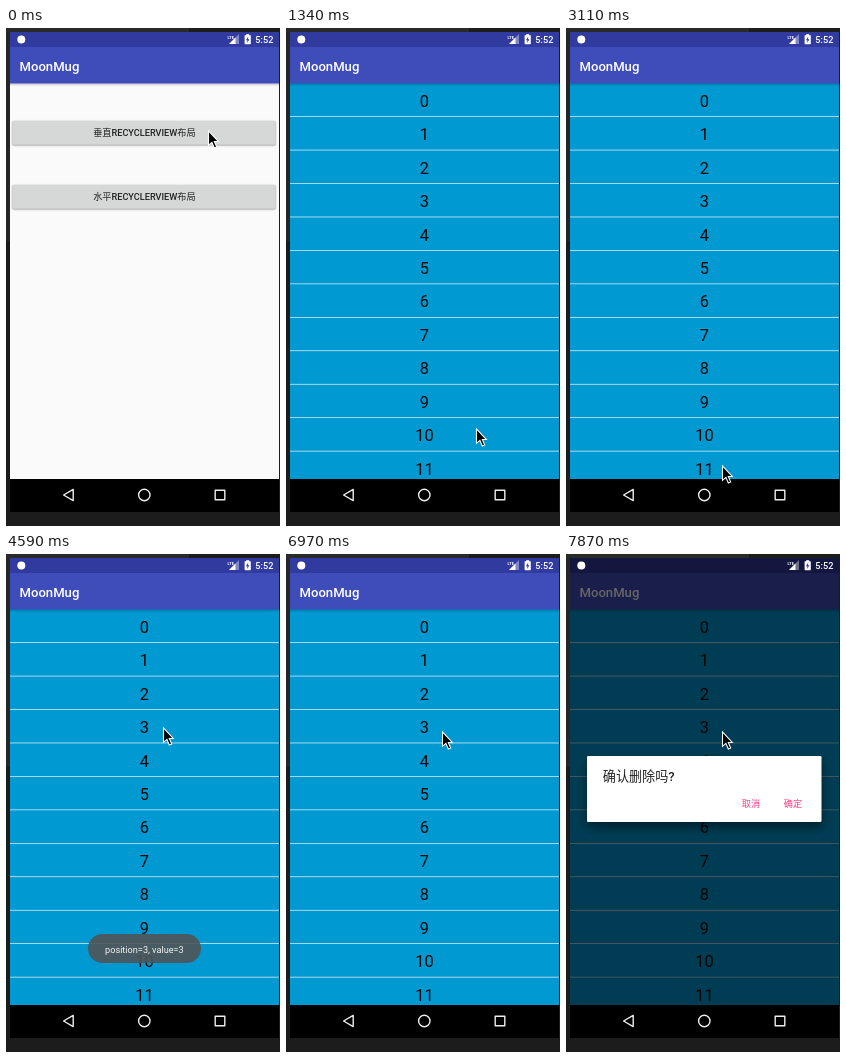
An HTML page with a canvas for the animation above (8000 ms loop, 274 px wide and 498 px high).

```html
<!DOCTYPE html>
<html lang="zh-CN">
<head>
<meta charset="utf-8">
<title>List demo</title>
<style>
html, body { margin: 0; width: 100%; height: 100%; overflow: hidden; background: #1c1c1c; }
canvas { display: block; width: 274px; height: 498px; }
</style>
</head>
<body>
<canvas></canvas>
<script>
const WIDTH = 274, HEIGHT = 498, LOOP = 8000, STEPS = 54;
const LEFT = 4, TOP = 4, SCREEN_W = 269, CENTER = 138.4;
const BAR_TOP = 19, LIST_TOP = 55.5, NAV_TOP = 451, SCREEN_BOTTOM = 484;
const ROWS = 20, ROW_HEIGHT = 33.45, DIVIDER = 0.65;
const MAX_SCROLL = ROWS * ROW_HEIGHT - (NAV_TOP - LIST_TOP);
const BODY_SIZE = 9.16, TITLE_SIZE = 13.1, ROW_SIZE = 16.36;
const STATUS_BLUE = '#303a9f', PINK = '#fb3c86';
const FONT = 'Roboto, "Noto Sans CJK SC", "Noto Sans CJK", sans-serif';

const arrow = new Path2D('M0 0v14.6l3.4-3 2.4 5.6 2.4-1.1-2.4-5.4h4z');
const signal = new Path2D('M223 16h10V6z');
const signalLevel = new Path2D('M223 16h6.5V9.5z');
const bolt = new Path2D('M242.2 8.4l-2.2 3.8h1.4l-.2 2.8 2.2-3.8h-1.4z');
const navIcons = new Path2D('M57.6 467l9.6-5.6v11.2zM209.2 462.2h9.6v9.6h-9.6z');
navIcons.moveTo(144, 467);
navIcons.arc(138.3, 467, 5.7, 0, 2 * Math.PI);

const canvas = document.querySelector('canvas');
const ctx = canvas.getContext('2d');
const ratio = window.devicePixelRatio || 1;
canvas.width = WIDTH * ratio;
canvas.height = HEIGHT * ratio;

const ramp = (step, from, to) => Math.min(1, Math.max(0, (step - from) / (to - from)));
const smooth = p => p * p * (3 - 2 * p);

function cursorAt(step) {
  let x = 202, y = 102;
  const glide = (from, to, toX, toY) => {
    const p = smooth(ramp(step, from, to));
    x += (toX - x) * p;
    y += (toY - y) * p;
  };
  glide(0, 1, 202, 104);
  glide(6, 9, 190, 400);
  glide(9, 12, 183, 11);
  glide(13, 15, 163, 143);
  glide(16, 19, 167, 480);
  glide(20, 21, 156, 437);
  glide(21, 23, 127, 69);
  glide(23, 24, 157, 173);
  glide(43, 47, 156, 177);
  return [x, y];
}

function rect(x, y, w, h, color) {
  ctx.fillStyle = color;
  ctx.fillRect(x, y, w, h);
}

function roundRect(x, y, w, h, r, color) {
  ctx.fillStyle = color;
  ctx.beginPath();
  ctx.roundRect(x, y, w, h, r);
  ctx.fill();
}

function shape(path, color) {
  ctx.fillStyle = color;
  ctx.fill(path);
}

function text(str, x, y, size, color, weight = 400, align = 'center') {
  ctx.font = `${weight} ${size}px ${FONT}`;
  ctx.textAlign = align;
  ctx.fillStyle = color;
  ctx.fillText(str, x, y);
}

function withShadow(blur, offset, alpha, draw) {
  ctx.save();
  ctx.shadowColor = `rgba(0,0,0,${alpha})`;
  ctx.shadowBlur = blur * ratio;
  ctx.shadowOffsetY = offset * ratio;
  draw();
  ctx.restore();
}

function drawFrame() {
  rect(0, 0, WIDTH, HEIGHT, '#1c1c1c');
  rect(0, 0, LEFT, 213, '#262626');
  rect(0, 0, 183, TOP, '#2a2a2a');
  rect(LEFT, TOP, SCREEN_W, SCREEN_BOTTOM - TOP, '#000');
  rect(LEFT, TOP, SCREEN_W, BAR_TOP - TOP, STATUS_BLUE);
}

function drawAppBar() {
  rect(LEFT, TOP, SCREEN_W, BAR_TOP - TOP, STATUS_BLUE);
  rect(LEFT, BAR_TOP, SCREEN_W, LIST_TOP - BAR_TOP, '#3f4dba');
  const shade = ctx.createLinearGradient(0, LIST_TOP, 0, LIST_TOP + 3);
  shade.addColorStop(0, 'rgba(0,0,0,.2)');
  shade.addColorStop(1, 'rgba(0,0,0,0)');
  rect(LEFT, LIST_TOP, SCREEN_W, 3, shade);
  text('MoonMug', 13.5, 42.8, TITLE_SIZE, '#fff', 500, 'left');
}

function drawButton(label, y, pressed) {
  withShadow(pressed ? 4 : 1.5, pressed ? 1.5 : 0.7, 0.4, () =>
    roundRect(6.3, y, 263.4, 24, 1.3, pressed ? '#c3c4c4' : '#d6d7d7'));
  text(label, CENTER, y + 15.2, BODY_SIZE, '#202020', 500);
}

function drawMenu(pressed) {
  rect(LEFT, BAR_TOP, SCREEN_W, NAV_TOP - BAR_TOP, '#fafafa');
  drawButton('垂直RECYCLERVIEW布局', 92.8, pressed);
  drawButton('水平RECYCLERVIEW布局', 156.7, false);
  drawAppBar();
}

function drawList(scroll, shift) {
  ctx.save();
  ctx.translate(0, shift);
  ctx.beginPath();
  ctx.rect(LEFT, TOP, SCREEN_W, NAV_TOP - TOP);
  ctx.clip();
  rect(LEFT, BAR_TOP, SCREEN_W, NAV_TOP - BAR_TOP, '#0099d2');
  for (let i = 0; i < ROWS; i++) {
    const y = LIST_TOP + i * ROW_HEIGHT - scroll;
    rect(LEFT, y + ROW_HEIGHT - DIVIDER, SCREEN_W, DIVIDER, '#fafafa');
    text(i, CENTER, y + 23.2, ROW_SIZE, '#0a0a0a');
  }
  drawAppBar();
  ctx.restore();
}

function drawToast(alpha) {
  ctx.save();
  ctx.globalAlpha = alpha;
  roundRect(82, 380, 113, 29, 14.5, 'rgba(80,85,87,.9)');
  text('position=3, value=3', CENTER, 398.5, BODY_SIZE, '#f4f4f4');
  ctx.restore();
}

function drawDialog(alpha) {
  ctx.save();
  ctx.globalAlpha = alpha;
  rect(LEFT, TOP, SCREEN_W, NAV_TOP - TOP, 'rgba(0,0,0,.6)');
  withShadow(11, 5, 0.5, () => roundRect(21, 202, 234.5, 66, 1.3, '#fff'));
  text('确认删除吗?', 36.8, 227.3, TITLE_SIZE, '#212121', 500, 'left');
  text('取消', 185, 253.3, BODY_SIZE, PINK, 500);
  text('确定', 227, 253.3, BODY_SIZE, PINK, 500);
  ctx.restore();
}

function drawSystemIcons() {
  roundRect(11.3, 7.5, 8, 8, 4, '#fff');
  text('LTE', 221.5, 10.5, 4, '#fff', 700, 'left');
  shape(signal, 'rgba(255,255,255,.4)');
  shape(signalLevel, '#fff');
  rect(240.2, 6.2, 3, 2, '#fff');
  roundRect(238.6, 7.2, 6.2, 9, 0.6, '#fff');
  shape(bolt, STATUS_BLUE);
  text('5:52', 249.3, 15, BODY_SIZE, '#fff', 500, 'left');
  ctx.strokeStyle = '#ededed';
  ctx.lineWidth = 1.4;
  ctx.lineJoin = 'round';
  ctx.stroke(navIcons);
}

function drawCursor(x, y) {
  ctx.save();
  ctx.translate(x + 0.5, y + 0.8);
  shape(arrow, '#000');
  ctx.strokeStyle = '#fff';
  ctx.lineWidth = 1.1;
  ctx.lineJoin = 'miter';
  ctx.stroke(arrow);
  ctx.restore();
}

function draw(time) {
  // The screen updates in even steps; the small lead absorbs rounding.
  const step = Math.min(STEPS - 1, Math.floor((time % LOOP + 10) / LOOP * STEPS));
  const scroll = MAX_SCROLL * (smooth(ramp(step, 9, 12)) - smooth(ramp(step, 16, 19)));
  ctx.setTransform(ratio, 0, 0, ratio, 0, 0);
  drawFrame();
  if (step < 5) drawMenu(step >= 3);
  else drawList(scroll, step === 5 ? 2 : 0);
  drawToast(ramp(step, 27, 31) - ramp(step, 39, 43));
  drawDialog(ramp(step, 51, 53));
  drawSystemIcons();
  drawCursor(...cursorAt(step));
}

const start = performance.now();
function tick() {
  draw(performance.now() - start);
  requestAnimationFrame(tick);
}
tick();
</script>
</body>
</html>
```
